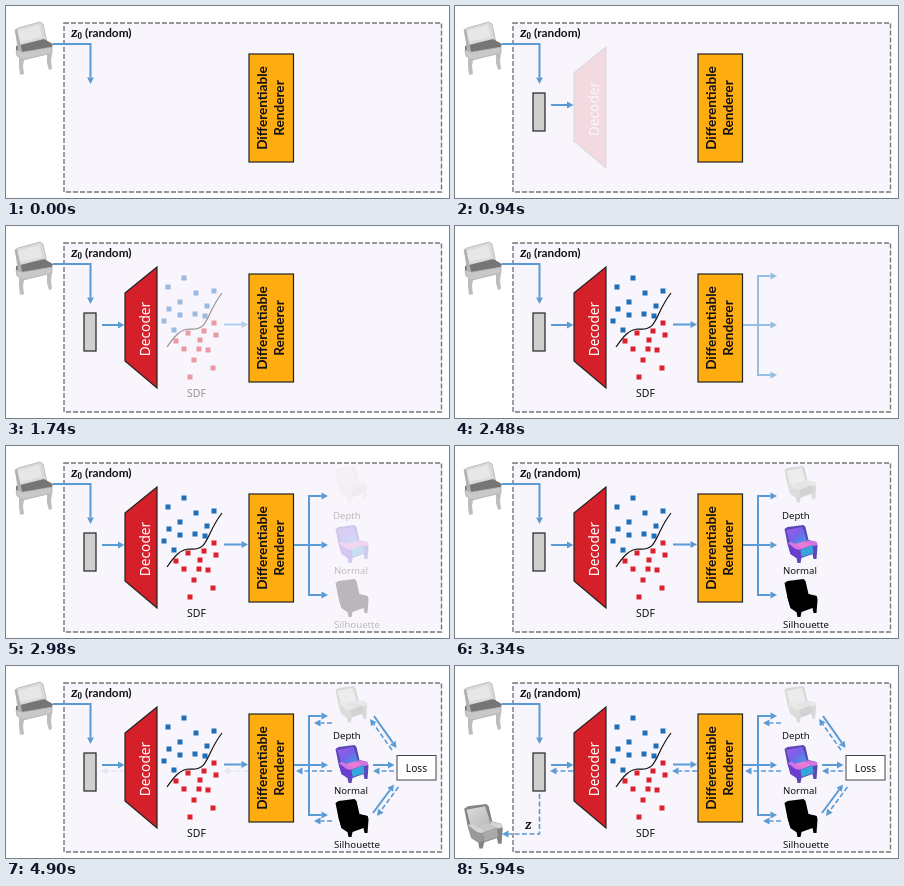
An HTML page for the animation above (9.02 s loop, 443x192 px).

```html
<!DOCTYPE html>
<html lang="en">
<head>
<meta charset="utf-8">
<title>Shape optimisation pipeline</title>
<style>
html, body { margin: 0; width: 100%; height: 100%; overflow: hidden; background: #fff; }
svg { display: block; width: 100vw; height: 100vh; }
text { font-family: "Noto Sans", "Open Sans", sans-serif; }
.bold { font-family: Lato, "Open Sans", sans-serif; font-weight: 700; }
.math { font-family: "Noto Serif", "Liberation Serif", serif; font-weight: 700; font-style: italic; }
</style>
</head>
<body>
<svg id="stage" viewBox="0 0 443 192">
  <defs>
    <linearGradient id="normals" x1="0" y1="0" x2="1" y2="1">
      <stop offset="0" stop-color="#a65be8"/>
      <stop offset=".45" stop-color="#7860e8"/>
      <stop offset="1" stop-color="#36a8e6"/>
    </linearGradient>
    <linearGradient id="fabric" x1="0" y1="0" x2="1" y2="1">
      <stop offset="0" stop-color="#dedede"/>
      <stop offset="1" stop-color="#b8b8b8"/>
    </linearGradient>
  </defs>
</svg>
<script>
const LOOP = 9020, STEP = 60, BLUE = "#5b9bd5";
const stage = document.getElementById("stage");

function add(parent, tag, attrs, content) {
  const el = document.createElementNS("http://www.w3.org/2000/svg", tag);
  for (const key in attrs) el.setAttribute(key, attrs[key]);
  if (content) el.textContent = content;
  parent.appendChild(el);
  return el;
}

const poly = (parent, points, fill, extra) => add(parent, "polygon", { points, fill, ...extra });

function label(parent, content, x, y, size, extra) {
  return add(parent, "text", { x, y, "font-size": size, fill: "#111", ...extra }, content);
}

function upright(parent, content, x, y, size, extra) {
  label(parent, content, 0, 0, size, {
    transform: `translate(${x} ${y}) rotate(-90)`, "text-anchor": "middle", ...extra
  });
}

// Polyline through the points, closed by a solid triangular head.
function arrow(parent, points, dashed) {
  const [x, y] = points[points.length - 1];
  const [px, py] = points[points.length - 2];
  const len = Math.hypot(x - px, y - py);
  const ux = (x - px) / len, uy = (y - py) / len;
  const size = 6.5, half = 3.4;
  const bx = x - ux * size, by = y - uy * size;
  add(parent, "polyline", {
    points: [...points.slice(0, -1), [bx, by]].join(" "),
    fill: "none", stroke: BLUE, "stroke-width": dashed ? 1.6 : 2,
    "stroke-dasharray": dashed ? "5 2.5" : "none"
  });
  poly(parent, [[x, y], [bx - uy * half, by + ux * half], [bx + uy * half, by - ux * half]].join(" "), BLUE);
}

// Armchair seen from the upper right; palette gives each surface its colour.
function armchair(parent, x, y, c, scale = 1) {
  const g = add(parent, "g", { transform: `translate(${x} ${y}) scale(${scale})` });
  poly(g, "1,4 4,2 20,0 22,2 25,15 33,17 34,21 33,34 30,34 29,29 18,33 17,38 14,38 13,33 7,29 4,19", c.body);
  poly(g, "3,5 19,2 23,15 21,18 7,20", c.back);
  poly(g, "7,20 22,16 29,20 16,25", c.seat);
  poly(g, "4,18 7,18 17,24 17,32 13,33 7,29", c.side);
  poly(g, "17,25 29,20 30,28 18,32", c.front);
  poly(g, "23,15 33,17 34,20 30,21 24,18", c.arm);
  poly(g, "4,18 8,17 18,23 16,25 12,24", c.arm);
}

function sourceChair(parent) {
  poly(parent, "9,24 12,22 34,16 37,18 41,37 14,44", "#dadada", { stroke: "#aaa", "stroke-width": .7 });
  poly(parent, "12,25 33,19 36,31 14,36", "#e7e7e7");
  poly(parent, "10,40 38,33 47,38 46,41 17,46 10,44", "#757575");
  poly(parent, "10,44 17,46 46,41 46,47 17,54 11,50", "#c9c9c9", { stroke: "#999", "stroke-width": .6 });
  poly(parent, "13,52 18,54 17,60 18,68 14,69 13,61", "#bdbdbd");
  poly(parent, "41,48 46,47 45,55 46,63 43,64 41,57", "#bdbdbd");
  poly(parent, "9,24 11,23 16,45 12,45", "#b2b2b2");
}

const base = add(stage, "g");
add(base, "rect", {
  x: 58, y: 17, width: 377.5, height: 169, fill: "#f8f5fc",
  stroke: "#777", "stroke-width": 1.4, "stroke-dasharray": "5 2"
});
sourceChair(base);
arrow(base, [[47, 38], [84.5, 38], [84.5, 78]]);
label(base, "z", 65, 31, 12, { class: "math" });
label(base, "0", 71.5, 33, 8, { class: "math", style: "font-style:normal" });
label(base, "(random)", 79, 31, 11.8, { class: "bold" });
add(base, "rect", { x: 243, y: 48, width: 44.5, height: 108, fill: "#ffac10", stroke: "#222", "stroke-width": 1.2 });
upright(base, "Differentiable", 260.5, 102, 13.6, { class: "bold" });
upright(base, "Renderer", 277.5, 102, 13.6, { class: "bold" });

const fades = [];
function fade(start, steps) {
  const g = add(stage, "g", { opacity: 0 });
  fades.push({ g, start, steps });
  return g;
}

const code = fade(260, 8);
add(code, "rect", { x: 78, y: 87, width: 12, height: 38, fill: "#d0cece", stroke: "#222", "stroke-width": 1.2 });
arrow(code, [[96, 99], [118.5, 99]]);

const decoder = fade(940, 8);
poly(decoder, "119,67 151,41 151,162 119,135", "#d5202a", { stroke: "#222", "stroke-width": 1.2 });
upright(decoder, "Decoder", 143.5, 103, 13.7, { fill: "#fff" });

const sdf = fade(1620, 7);
const above = [[178, 52], [162, 61], [190, 67], [208, 65], [174, 76], [201, 80],
  [163, 83], [189, 88], [174, 89], [199, 90], [158, 95], [168, 104]];
const below = [[208, 97], [198, 105], [182, 107], [210, 109], [170, 115], [194, 114],
  [178, 123], [193, 123], [202, 124], [188, 134], [207, 142], [184, 151]];
for (const [dots, fill] of [[above, "#1f6fb9"], [below, "#dc202c"]])
  for (const [x, y] of dots) add(sdf, "rect", { x: x - 2.5, y: y - 2.5, width: 5, height: 5, fill });
add(sdf, "path", {
  d: "M161 121C168 111 174 103 184 103C203 105 199 89 216 67",
  fill: "none", stroke: "#111", "stroke-width": 1.2
});
label(sdf, "SDF", 190.5, 171, 10.5, { "text-anchor": "middle" });
arrow(sdf, [[218, 98.5], [242, 98.5]]);

const split = fade(2240, 8);
add(split, "path", { d: "M288 99H303", stroke: BLUE, "stroke-width": 2 });
for (const y of [50, 99, 149]) arrow(split, [[303, 99], [303, y], [322, y]].filter((p, i) => y !== 99 || i !== 1));

const views = fade(2920, 8);
armchair(views, 328.5, 20, {
  body: "#d9d9d9", back: "#ececec", seat: "#e4e4e4", side: "#dddddd", front: "#d2d2d2", arm: "#e8e8e8"
}, .96);
armchair(views, 328.5, 79, {
  body: "#5949b8", back: "url(#normals)", seat: "#e77bd5", side: "#6a3fd0", front: "#35a6dc", arm: "#d574e0"
});
const black = { body: "#000", back: "#000", seat: "#000", side: "#000", front: "#000", arm: "#000" };
armchair(views, 328.5, 133, black);
label(views, "Depth", 327, 72.5, 9.6);
label(views, "Normal", 328, 127.5, 9.6);
label(views, "Silhouette", 328, 181.5, 9.7);

const loss = fade(3600, 7);
add(loss, "rect", { x: 391, y: 89.5, width: 39, height: 24.5, fill: "#fff", stroke: "#444", "stroke-width": 1 });
label(loss, "Loss", 410.5, 106, 10.2, { "text-anchor": "middle" });
arrow(loss, [[368, 50], [390.5, 82]]);
arrow(loss, [[367, 99], [388.5, 99]]);
arrow(loss, [[367, 147], [388, 118.5]]);

const back = fade(4220, 8);
arrow(back, [[386, 84], [364, 53]], true);
arrow(back, [[388, 105], [367, 105]], true);
arrow(back, [[392.5, 121], [371, 150]], true);
arrow(back, [[326, 57], [308, 57]], true);
arrow(back, [[326, 105], [290, 105]], true);
arrow(back, [[326, 155], [308, 155]], true);

const through = fade(4900, 7);
arrow(through, [[242, 105], [217, 105]], true);
arrow(through, [[118, 105], [95, 105]], true);

const result = fade(5520, 8);
arrow(result, [[84.5, 128], [84.5, 168], [47, 168]], true);
label(result, "z", 70, 163, 12, { class: "math" });
armchair(result, 8, 138, {
  body: "#858585", back: "url(#fabric)", seat: "#c7c7c7", side: "#999", front: "#aaa", arm: "#d4d4d4"
}, 1.17);

function draw(time) {
  const t = time % LOOP;
  for (const { g, start, steps } of fades) {
    const step = Math.floor((t - start) / STEP) + 1;
    g.setAttribute("opacity", Math.min(1, Math.max(0, step / steps)));
  }
}

const began = performance.now();
function tick() {
  draw(performance.now() - began);
  requestAnimationFrame(tick);
}
tick();
</script>
</body>
</html>
```
